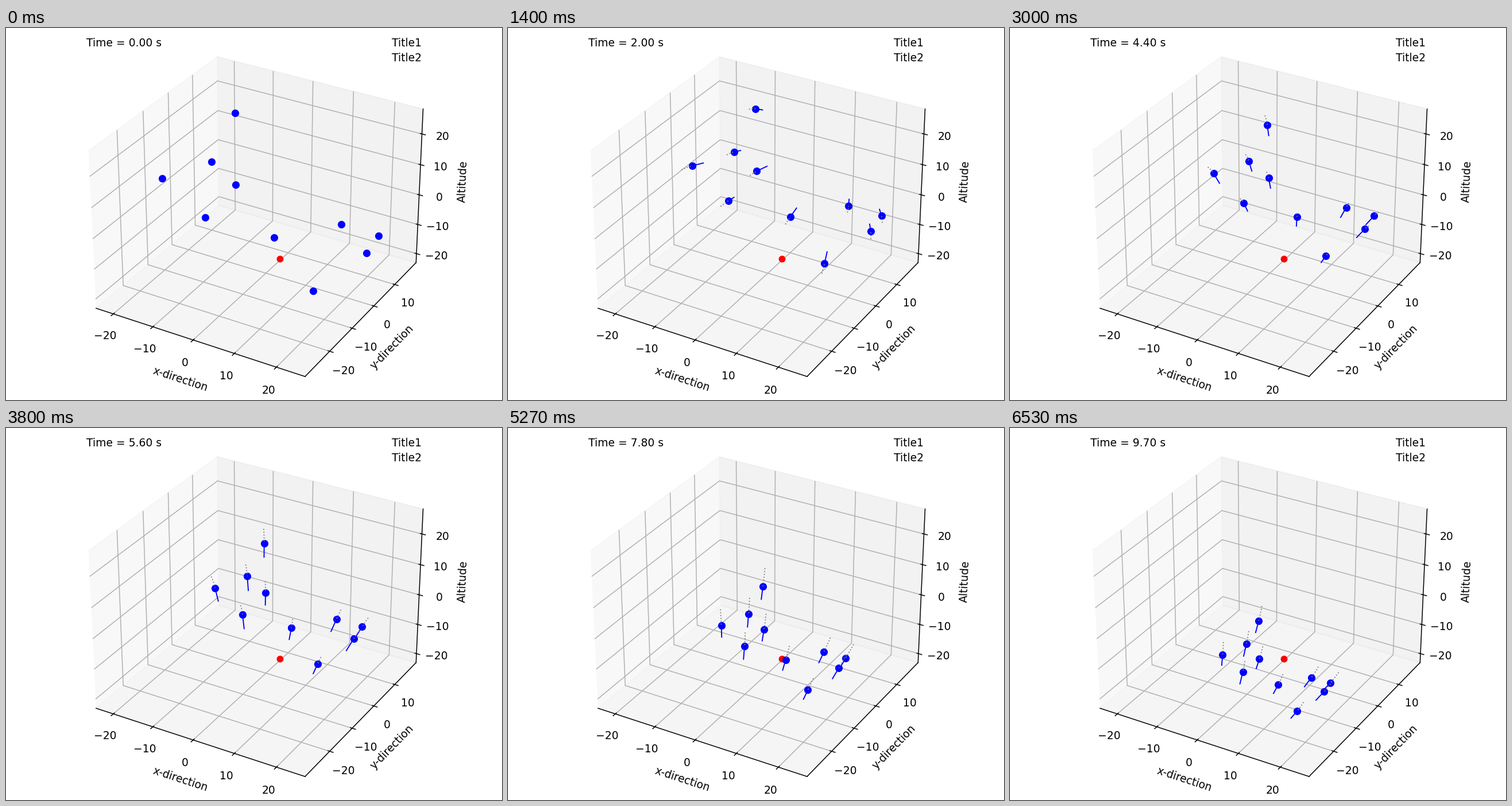
Animation, 864 px wide and 648 px high, one loop 6.59 s. Source, as a matplotlib script:

```python
import numpy as np
import matplotlib.pyplot as plt
from matplotlib.animation import FuncAnimation

FRAMES, LOOP_MS, DT = 99, 6590, 0.1
TRAIL = 9                       # samples of history behind each agent
HEADING, CRUISE = 3.8, 2.7      # stroke length, swarm speed that gives it in full
DECAY = 0.072                   # rate at which the swarm contracts
MID, HALF = (1.14, -5.0, 2.45), 25.56
GOAL = (7.65, -7.38, -9.83)

START = np.array([
    (-12.5, 8.2, 20.6), (-20.6, 11.3, -0.5), (-17.6, -13.8, 11.1),
    (2.0, -16.2, 17.9), (-21.3, 9.3, -18.6), (12.5, -18.6, 6.8),
    (19.0, -1.3, 1.8), (24.7, 5.3, -4.1), (22.7, 3.7, -9.6),
    (23.1, -20.9, -4.3)])


def centre(t):
    """Drift of the swarm: cubic sideways, a slow swing in height."""
    return np.array([3.42 + 2.916 * t - 0.33 * t**2 + 0.0083 * t**3,
                     -3.68 - 1.145 * t + 0.017 * t**2 + 0.0022 * t**3,
                     13.32 - 14.4 * (1 - np.cos(0.367 * (t - 3.58)))])


def swarm(t):
    """Positions of all agents, shrinking towards the moving centre."""
    return centre(t) + np.exp(-DECAY * t) * (START - centre(0))


def rate(path, t, h=0.01):
    return (path(t + h) - path(t - h)) / (2 * h)


def heading(t):
    v = rate(swarm, t)
    length = HEADING * min(1, np.linalg.norm(rate(centre, t)) / CRUISE)
    return length * v / np.linalg.norm(v, axis=1, keepdims=True)


fig = plt.figure(figsize=(6.4, 4.8), dpi=135)
ax = fig.add_axes([0, 0, 1, 1], projection='3d')
for axis, mid, top in zip('xyz', MID, (20, 10, 20)):
    ax.set(**{axis + 'lim': (mid - HALF, mid + HALF),
              axis + 'ticks': range(-20, top + 1, 10)})
ax.set(xlabel='x-direction', ylabel='y-direction', zlabel='Altitude')

clock = ax.text2D(0.05, 0.95, '', transform=ax.transAxes)
for y, label in ((0.95, 'Title1'), (0.91, 'Title2')):
    ax.text2D(0.95, y, label, transform=ax.transAxes, ha='right')

ax.plot(*np.transpose([GOAL]), 'o', color='red', ms=5.3)
dots, = ax.plot([], [], [], 'o', color='blue', ms=6)
strokes = [ax.plot([], [], [], color='blue', lw=1)[0] for _ in START]
trails = [ax.plot([], [], [], ':', color='gray', lw=1)[0] for _ in START]


def update(i):
    clock.set_text(f'Time = {max(i - 1, 0) * DT:.2f} s')
    past = np.array([swarm(j * DT) for j in range(max(0, i - TRAIL), i + 1)])
    now = past[-1]
    tip = now + heading(i * DT)
    dots.set_data_3d(*now.T)
    for n, (stroke, trail) in enumerate(zip(strokes, trails)):
        stroke.set_data_3d(*np.transpose([now[n], tip[n]]))
        trail.set_data_3d(*past[:, n].T)
        stroke.set_visible(i > 0)
        trail.set_visible(i > 0)
    return [clock, dots, *strokes, *trails]


anim = FuncAnimation(fig, update, frames=FRAMES, interval=LOOP_MS / FRAMES,
                     init_func=lambda: update(0), repeat=True, repeat_delay=0)
plt.show()
```
